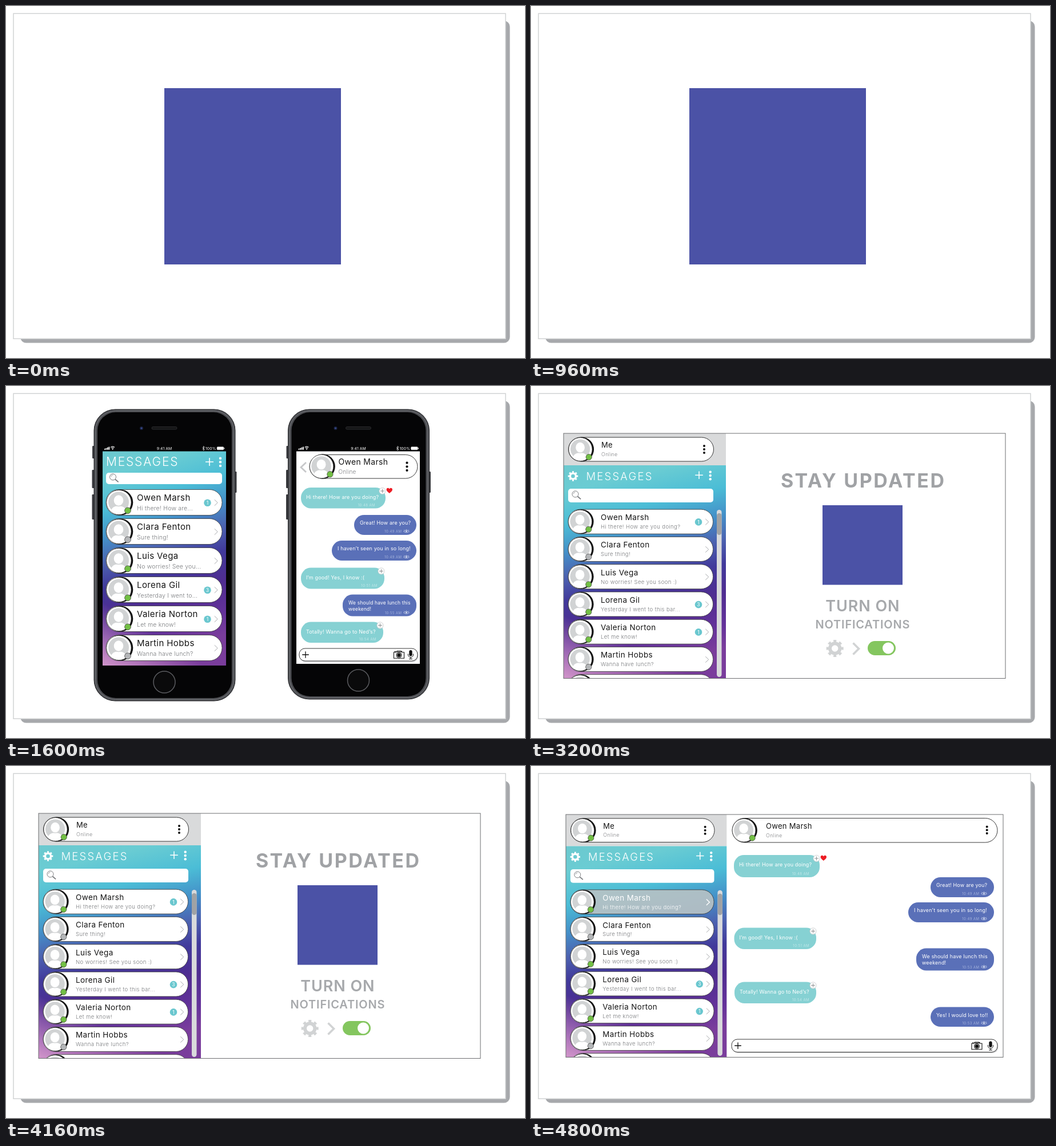
An HTML page for the animation above (6.4 s loop, 908 by 617 pixels).

```html
<!DOCTYPE html>
<html lang="en">
<head>
<meta charset="utf-8">
<title>Messaging app</title>
<style>
html, body { margin: 0; width: 100%; height: 100%; overflow: hidden; background: #fff; }
svg { display: block; width: 908px; height: 617px; }
text { font-family: Inter, "Liberation Sans", Arial, sans-serif; font-optical-sizing: none; white-space: pre; }
</style>
</head>
<body>
<svg id="stage" viewBox="0 0 908 617" xmlns="http://www.w3.org/2000/svg"></svg>
<script>
const HOLD = 1600;
const TEAL = '#86d1d3', BLUE = '#5a70b8', GREY = '#d1d3d4', GREEN = '#72bf44', LOGO = '#4b52a6';

const people = [
  { name: 'Owen Marsh', short: 'Hi there! How are...', long: 'Hi there! How are you doing?', badge: 1, online: true },
  { name: 'Clara Fenton', short: 'Sure thing!' },
  { name: 'Luis Vega', short: 'No worries! See you...', long: 'No worries! See you soon :)', online: true },
  { name: 'Lorena Gil', short: 'Yesterday I went to...', long: 'Yesterday I went to this bar...', badge: 3, online: true },
  { name: 'Valeria Norton', short: 'Let me know!', badge: 1, online: true },
  { name: 'Martin Hobbs', short: 'Wanna have lunch?' }
];
const friend = people[0].name;

// Basic shapes
const rect = (x, y, w, h, r, fill, extra = '') =>
  `<rect x="${x}" y="${y}" width="${w}" height="${h}" rx="${r}" fill="${fill}" ${extra}/>`;
const circle = (x, y, r, fill, extra = '') =>
  `<circle cx="${x}" cy="${y}" r="${r}" fill="${fill}" ${extra}/>`;
const line = (d, color, width, extra = '') =>
  `<path d="${d}" fill="none" stroke="${color}" stroke-width="${width}" ${extra}/>`;
const edge = (color, width) => `stroke="${color}" stroke-width="${width}"`;
const group = (x, y, body, scale = 1) =>
  `<g transform="translate(${x} ${y}) scale(${scale})">${body}</g>`;
const sky = (x, y, w, h) =>
  rect(x, y, w, h, 0, 'url(#sky)') + rect(x, y, w, h, 0, 'url(#glow)');

function text(x, y, str, size, { fill = '#151515', weight = 400, gap = 0.3, anchor = 'start' } = {}) {
  return `<text x="${x}" y="${y}" font-size="${size}" font-weight="${weight}" fill="${fill}" ` +
    `letter-spacing="${gap}" text-anchor="${anchor}">${str}</text>`;
}

// Icons
const plus = (x, y, r, color, width) =>
  line(`M${x - r} ${y}h${2 * r}M${x} ${y - r}v${2 * r}`, color, width);
const dots = (x, y, step, r, color) =>
  [-1, 0, 1].map(i => circle(x, y + i * step, r, color)).join('');
const chevron = (x, y, w, h, color, width) =>
  line(`M${x - w / 2} ${y - h / 2}l${w} ${h / 2}l${-w} ${h / 2}`, color, width);
const magnifier = (x, y) =>
  circle(x, y, 5.5, 'none', edge('#77797c', 1)) +
  line(`M${x - 3.2} ${y - 0.5}a3.2 3.2 0 0 1 3 -2.8`, '#77797c', 0.7) +
  line(`M${x + 4} ${y + 4}l5.6 4.8`, '#77797c', 1.7);
const gear = (x, y, r, color) =>
  circle(x, y, r * 0.58, 'none', edge(color, r * 0.4)) +
  circle(x, y, r * 0.86, 'none', edge(color, r * 0.28) + ' pathLength="16" stroke-dasharray="1 1" stroke-dashoffset=".5"');
const heart = (x, y) =>
  group(x, y, '<path d="M0 4.8C-3 2.2-5.2.6-5.2-1.8C-5.2-5-1.2-5.4 0-2.7C1.2-5.4 5.2-5 5.2-1.8C5.2.6 3 2.2 0 4.8Z" fill="#ed1c24"/>');
const eye = (x, y) => group(x, y,
  line('M-5 .3Q0 -4.2 5 .3Q0 4.4 -5 .3Z M-3.4 -1.6l-.9 -1 M0 -2.2v-1.2 M3.4 -1.6l.9 -1', '#d5dcf0', 0.7) +
  circle(0, 0.2, 1.4, '#d5dcf0'));
const camera = (x, y) => group(x, y,
  line('M-4.5 -5h9l1 -1.5M-5 -4.2h-4v10.5h18V-4.2h-4l-1.5 -2.3h-7zM-8 -5.5h2.5', '#111', 1.1) +
  circle(0, 0.8, 5, '#111') + circle(0, 0.8, 3.7, 'none', edge('#fff', 0.7)));
const mic = (x, y) => group(x, y,
  rect(-2.7, -7.5, 5.4, 10.5, 2.7, '#111') +
  line('M-4.6 -1v1.5a4.6 4.6 0 0 0 9.2 0V-1M0 5v3M-3 8h6', '#111', 1));

function avatar(x, y, scale, online) {
  return group(x, y,
    circle(1.2, 0, 22.6, '#111') +
    circle(-1, 0, 21.6, '#fff', edge('#222', 0.6)) +
    circle(-1.5, -0.5, 18, GREY) +
    '<path d="M-14 13C-12 7.5-7 6.5-1.5 6.5S9 7.5 11 13A18 18 0 0 1-14 13Z" fill="#fff"/>' +
    `<ellipse cx="-1.5" cy="-3.5" rx="9" ry="10" fill="#fff" ${edge(GREY, 1.4)}/>` +
    circle(14.5, 14.3, 5.4, online ? GREEN : '#b4b6b8', edge('#333', 0.7)), scale);
}

// Contact list
const phoneRow = { x: 175, w: 203, h: 45, r: 22, face: 23.5, scale: 1, textX: 54, name: 15, sub: 10.5, up: 3, down: 14, subGap: 0.2, key: 'short' };
const deskRow = { x: 65, w: 253.5, h: 43, r: 21, face: 22, scale: 0.95, textX: 57, name: 13.5, sub: 9.5, up: 2.5, down: 12.5, subGap: 0.4, key: 'long' };

function row(c, cy, p, selected) {
  const right = c.x + c.w;
  let s = rect(c.x, cy - c.h / 2, c.w, c.h, c.r, selected ? '#b9c2c5' : '#fff',
    edge('#333', 0.8) + (selected ? ' fill-opacity=".9"' : ''));
  s += avatar(c.x + c.face, cy, c.scale, p.online);
  s += text(c.x + c.textX, cy - c.up, p.name, c.name, { fill: selected ? '#fff' : '#151515', gap: 0.4 });
  s += text(c.x + c.textX, cy + c.down, p[c.key] || p.short, c.sub,
    { fill: selected ? '#fff' : '#77797c', weight: 300, gap: c.subGap });
  if (p.badge && !selected) {
    s += circle(right - 25.5, cy + 0.7, 6.3, '#6ac7cf');
    s += text(right - 25.5, cy + 3.8, p.badge, 8.5, { fill: '#fff', gap: 0, anchor: 'middle' });
  }
  return s + chevron(right - 10.5, cy + 0.5, 5.5, 10.5, selected ? '#fff' : '#a7a9ac', selected ? 1.4 : 1);
}

// Conversation
function bubble(x, y, w, h, lines, time, { mine = false, liked = false, size = 9 } = {}) {
  const right = x + w;
  let s = rect(x, y, w, h, 17.5, mine ? BLUE : TEAL);
  lines.forEach((str, i) => {
    s += text(x + (mine ? 10 : 9), y + (mine ? 17 : 20.3) + i * 11.2, str, size, { fill: '#fff', gap: 0.15 });
  });
  s += text(right - (mine ? 25.5 : liked ? 18 : 12), y + h - 4, time + ' AM', 6,
    { fill: mine ? '#b9c5e6' : '#d3eeef', weight: 300, gap: 0.5, anchor: 'end' });
  if (mine) return s + eye(right - 17.5, y + h - 6.5);
  s += circle(right - 5.5, y + 6, 5.6, '#fff', edge('#c4c6c8', 0.8)) + plus(right - 5.5, y + 6, 3.4, '#77797c', 0.8);
  return liked ? s + heart(right + 6.8, y + 5.3) : s;
}
const mine = { mine: true }, liked = { liked: true };

const inputBar = (x, y, w, h) =>
  rect(x + 1.2, y + 1.6, w, h, 10, '#c9cacc') +
  rect(x, y, w, h, 10, '#fff', edge('#222', 0.9)) +
  plus(x + 11, y + h / 2, 5.8, '#111', 1.3);

const headPill = (x, y, w, h) => rect(x, y, w, h, h / 2, '#fff', edge('#222', 0.9));

// Phone case, drawn at the left phone's place
function phone(bottom, screen) {
  const button = (x, y, h) => rect(x, y, 4, h, 1.2, '#3a3b3f');
  const h = bottom - 41;
  return button(151, 105, 22) + button(150.5, 147, 32) + button(150.5, 190, 44) + button(399.5, 150, 37) +
    rect(154, 41, 247, h, 37, '#4b4c50', edge('#242528', 1)) +
    rect(156.5, 43.5, 242, h - 5, 35, 'none', edge('#77797d', 0.9)) +
    rect(160, 46, 235, h - 10, 32, '#050506') +
    circle(237, 74, 3, '#1b2340') + circle(237, 74, 1.3, '#3c4f96') +
    rect(255, 71.5, 44, 4.5, 2.2, '#151516', edge('#343538', 0.8)) +
    circle(277, bottom - 33, 19, '#0a0a0b', edge('#5b5c60', 1.5)) +
    screen + statusBar();
}

function statusBar() {
  const white = { fill: '#fff', gap: 0.1 };
  let s = '';
  for (let i = 0; i < 4; i++) s += rect(172 + i * 2.5, 109.8 - i * 1.1, 1.8, 2 + i * 1.1, 0.3, '#fff');
  s += line('M183.3 107.5a4.6 4.6 0 0 1 6.6 0M184.8 109.3a2.6 2.6 0 0 1 3.6 0', '#fff', 1.1) + circle(186.6, 111, 0.9, '#fff');
  s += text(277, 112, '9:41 AM', 6.8, { ...white, anchor: 'middle' });
  s += line('M343.5 107.3l4 3.8l-2 1.8v-7.4l2 1.8l-4 3.8', '#fff', 0.7);
  s += text(349, 112, '100%', 6.8, white);
  return s + rect(369.2, 106.8, 11.5, 5, 1, '#fff', edge('#fff', 0.5)) + rect(381.4, 108.2, 1.1, 2.4, 0.4, '#fff');
}

// Scenes
const logoScene = () => rect(277, 144, 309, 309, 0, LOGO);

function phoneScene() {
  const list =
    sky(169, 114.5, 216, 375.5) +
    text(175, 140, 'MESSAGES', 21, { fill: '#fff', weight: 300, gap: 1.8 }) +
    plus(356, 133, 7, '#fff', 1.6) + dots(375, 133.3, 6.6, 2.2, '#fff') +
    rect(175, 152, 203, 20, 5, '#fff') + magnifier(187, 159.5) +
    people.map((p, i) => row(phoneRow, 204 + i * 51, p)).join('');
  const chat =
    rect(508, 114.5, 216, 372.5, 0, '#fff') +
    line('M525 134l-9 8.5l9 8.5', '#c7c8ca', 2.8) +
    headPill(531, 120.5, 189, 41.5) + avatar(553, 141, 0.96, true) +
    text(581.5, 138, friend, 14) +
    text(581.5, 154, 'Online', 10, { fill: '#808285', weight: 300, gap: 0.2 }) +
    dots(701.5, 141.3, 6.6, 2.1, '#111') +
    bubble(516, 178, 148, 36.5, ['Hi there! How are you doing?'], '10:48', liked) +
    bubble(609, 226, 109, 35, ['Great! How are you?'], '10:49', mine) +
    bubble(570, 271, 148, 35, ['I haven’t seen you in so long!'], '10:49', mine) +
    bubble(516, 318.5, 146, 37, ['I’m good! Yes, I know :('], '10:51') +
    bubble(589, 365.5, 129, 38, ['We should have lunch this', 'weekend!'], '10:55', { mine: true, size: 8.5 }) +
    bubble(516, 413.5, 144, 36.5, ['Totally! Wanna go to Ned’s?'], '10:54') +
    inputBar(513, 460, 207, 22) + camera(687.5, 471) + mic(708, 470.5);
  return phone(552, list) + group(339.5, 0, phone(549, group(-339.5, 0, chat)));
}

function sidebar(selected) {
  const next = { name: '', short: '', online: true };
  return rect(57, 83, 284, 56, 0, '#d9dadb') + sky(57, 139, 284, 373) +
    headPill(65.5, 90, 254, 42) + avatar(87.5, 111, 0.95, true) +
    text(123, 108, 'Me', 13) + text(123, 122.5, 'Online', 9, { fill: '#808285', weight: 300 }) +
    dots(303, 111, 6, 2, '#111') +
    gear(73.5, 158, 8.8, '#fff') +
    text(96.5, 165, 'MESSAGES', 18.5, { fill: '#fff', weight: 300, gap: 2.2 }) +
    plus(294, 156.3, 6.8, '#fff', 1.5) + dots(313.7, 157, 6.3, 2.2, '#fff') +
    rect(65, 180, 254, 24, 5, '#fff') + magnifier(77.5, 189.5) +
    [...people, next].map((p, i) => row(deskRow, 237.7 + i * 48.25, p, selected && i === 0)).join('') +
    rect(325, 217, 8.5, 293, 4.2, '#d9dadc') + rect(325, 223, 8.5, 38, 4.2, '#a0a2a5');
}

function promoScene() {
  const big = (y, str, size, weight, gap, fill) =>
    text(580 + gap / 2, y, str, size, { weight, gap, fill, anchor: 'middle' });
  return `<g clip-path="url(#win)">${sidebar(false)}</g>` +
    big(178, 'STAY UPDATED', 34, 700, 2.6, '#a0a2a5') +
    rect(510, 209, 140, 139.5, 0, LOGO) +
    big(395, 'TURN ON', 27, 600, 0.9, '#a7a9ac') +
    big(425, 'NOTIFICATIONS', 20, 600, 0.8, '#a7a9ac') +
    gear(531.7, 460, 15, GREY) + chevron(568.5, 460.5, 10, 20, GREY, 3.6) +
    rect(589, 447, 49, 25, 12.5, '#84c65f') + circle(625, 459.5, 10, '#fff') +
    rect(57, 83, 773, 429.5, 0, 'none', edge('#6d6e71', 1));
}

function chatScene() {
  const k = 0.9905;
  return group(61 - 57 * k, 85 - 83 * k, `<g clip-path="url(#win)">${sidebar(true)}</g>`, k) +
    headPill(352, 91.5, 464, 42.5) + avatar(373.5, 112.7, 0.94, true) +
    text(411, 110, friend, 13) + text(411, 125, 'Online', 9, { fill: '#808285', weight: 300 }) +
    dots(797.7, 112.3, 5.8, 2, '#111') +
    bubble(355, 156, 150, 39, ['Hi there! How are you doing?'], '10:48', liked) +
    bubble(699, 195, 111, 35, ['Great! How are you?'], '10:49', mine) +
    bubble(660, 239, 150, 35, ['I haven’t seen you in so long!'], '10:49', mine) +
    bubble(355.5, 283.5, 143.5, 37.5, ['I’m good! Yes, I know :('], '10:51') +
    bubble(674, 319.5, 136, 39, ['We should have lunch this', 'weekend!'], '10:53', mine) +
    bubble(356, 378.5, 143, 37.5, ['Totally! Wanna go to Ned’s?'], '10:54') +
    bubble(699, 422.5, 111, 34.5, ['Yes! I would love to!!'], '10:53', mine) +
    inputBar(351, 479, 465, 22.5) + camera(780, 490.5) + mic(804, 490) +
    rect(61, 85, 765, 425.5, 0, 'none', edge('#6d6e71', 1));
}

// Backdrop: bands rising to the right, with a pink glow from the lower left
const skyStops = [
  [0, '#6cc9cf'], [0.12, '#6accd3'], [0.27, '#4bbdd6'], [0.4, '#448fc8'], [0.51, '#4c62b0'],
  [0.62, '#41399b'], [0.75, '#4f2d91'], [0.9, '#64329a'], [1, '#7a3d9c']
];
const gradient = (id, [x1, y1, x2, y2], stops) =>
  `<linearGradient id="${id}" x1="${x1}" y1="${y1}" x2="${x2}" y2="${y2}">` +
  stops.map(([at, color]) => `<stop offset="${at}" stop-color="${color}"/>`).join('') + '</linearGradient>';
const defs = '<defs>' + gradient('sky', [0, 0, 0.18, 1], skyStops) +
  gradient('glow', [0.1, 0.74, 0, 1.02], [[0, '#d79bcd00'], [1, '#d79bcd']]) +
  '<clipPath id="win"><rect x="57" y="83" width="773" height="429.5"/></clipPath></defs>';

const stage = document.getElementById('stage');
stage.innerHTML = defs +
  rect(25, 26, 856.5, 564.5, 10, '#a7a9ac') +
  rect(13, 13.2, 861, 570, 0, '#fff', edge('#d1d3d4', 1.5)) +
  [logoScene, phoneScene, promoScene, chatScene].map(make => `<g class="scene">${make()}</g>`).join('');

const scenes = [...stage.querySelectorAll('.scene')];
const start = performance.now();

function draw(ms) {
  const current = Math.floor(ms / HOLD) % scenes.length;
  scenes.forEach((g, i) => { g.style.display = i === current ? '' : 'none'; });
}
function tick() {
  draw(performance.now() - start);
  requestAnimationFrame(tick);
}
tick();
</script>
</body>
</html>
```
